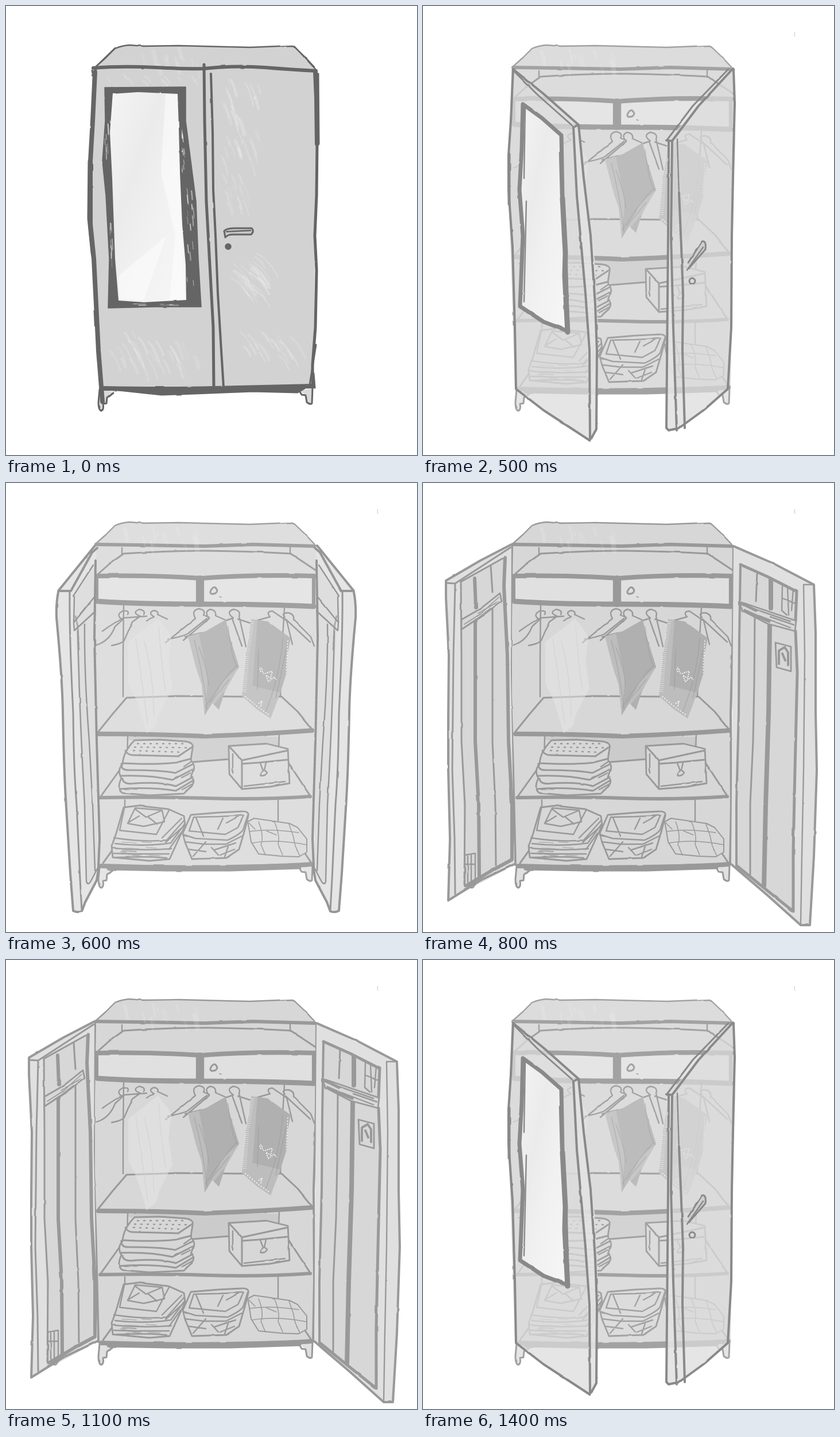
An HTML page that plays this animation: 716x782 px, repeating every 1500 ms.

```html
<!DOCTYPE html>
<html lang="en">
<head>
<meta charset="utf-8">
<title>Wardrobe</title>
<style>
  html, body { margin: 0; width: 100%; height: 100%; overflow: hidden; background: #fff; }
  svg { display: block; width: 100%; height: 100%; }
  path, circle { fill: none; stroke: var(--ink); stroke-width: 3; stroke-linecap: round; stroke-linejoin: round; }
  .fill { fill: var(--wood); stroke: none; }
  .pale { fill: var(--pale); stroke: none; }
  .dim { fill: var(--dim); stroke: none; }
  .solid { fill: var(--ink); }
  .w1 { stroke-width: 1.5; } .w2 { stroke-width: 2.4; } .w4 { stroke-width: 4; }
  .w5 { stroke-width: 5; } .w6 { stroke-width: 6; } .w8 { stroke-width: 8; }
  .item { fill: var(--wood); stroke-width: 2.8; }
  .cloth { fill: var(--cloth); stroke: none; }
  .sheen { fill: #fff; stroke: none; opacity: .16; }
  .scuff path { stroke: #fff; }

  .scene { animation: 1500ms step-end infinite; }
  #shut { --ink: #656565; --wood: #d2d2d2; --pale: #dadada; animation-name: shut; }
  #ajar { --ink: #a2a2a2; --wood: #dcdcdc; --pale: #e5e5e5; --dim: #d3d3d3; --cloth: #bcbcbc; animation-name: ajar; }
  #half { --ink: #a0a0a0; --wood: #dedede; --pale: #e5e5e5; --dim: #d3d3d3; --cloth: #bababa; animation-name: half; }
  #open { --ink: #999; --wood: #d7d7d7; --pale: #e0e0e0; --dim: #cbcbcb; --cloth: #b0b0b0; animation-name: open; }
  @keyframes shut { 0% { opacity: 1 } 33.333%, 100% { opacity: 0 } }
  @keyframes ajar { 0% { opacity: 0 } 33.333% { opacity: 1 } 40% { opacity: 0 } 93.333%, 100% { opacity: 1 } }
  @keyframes half { 0% { opacity: 0 } 40% { opacity: 1 } 53.333% { opacity: 0 } 86.666% { opacity: 1 } 93.333%, 100% { opacity: 0 } }
  @keyframes open { 0% { opacity: 0 } 53.333% { opacity: 1 } 86.666%, 100% { opacity: 0 } }
</style>
</head>
<body>
<svg viewBox="0 0 716 782" preserveAspectRatio="none">
  <defs>
    <filter id="rough" x="0" y="0" width="716" height="782" filterUnits="userSpaceOnUse" color-interpolation-filters="sRGB">
      <feTurbulence type="fractalNoise" baseFrequency=".035" numOctaves="2" seed="4"/>
      <feDisplacementMap in="SourceGraphic" scale="2" xChannelSelector="R" yChannelSelector="G"/>
    </filter>
    <linearGradient id="glass" x2="1" y2="1">
      <stop offset="0" stop-color="#f4f4f4"/><stop offset=".35" stop-color="#ebebeb"/>
      <stop offset=".6" stop-color="#f1f1f1"/><stop offset="1" stop-color="#f6f6f6"/>
    </linearGradient>

    <g id="carcass">
      <path class="fill" d="M154,108 190,74 215,68 420,72 500,69 541,110 544,240 538,400 536,664 163,668 154,440 148,320z"/>
      <path class="w2" d="M156,106 174,90 190,74 Q202,69 215,68 L240,70 300,69 380,71 425,72 500,69 520,88 537,106"/>
    </g>
    <g id="feet">
      <path class="pale" d="M163,668 161,690 Q162,704 167,705 L170,692 175,690 178,680 187,672z M512,670 522,678 524,690 533,693 534,666z"/>
      <path d="M163,668 161,690 Q161,704 166,705 Q171,703 169,693 L175,692 176,682 187,673"/>
      <path d="M511,670 515,677 522,678 524,690 Q530,695 533,692 L534,666"/>
    </g>

    <g id="shelves">
      <path class="pale" d="M160,166H330V207L160,204z M346,167 532,166V212L346,209z"/>
      <path class="dim" d="M212,442H476L478,463 454,455 390,456 386,482 326,485 322,456 214,448z"/>
      <path class="w2" d="M202,113V124 M495,110V124"/>
      <path d="M161,158 180,141 205,123 Q280,118 350,118 Q430,119 496,123 L541,153"/>
      <path class="w6" d="M157,107 230,108 345,110 430,107 538,110"/>
      <path class="w8" d="M159,162 Q250,160 340,166 Q430,159 537,162"/>
      <path style="stroke-width:9" d="M159,206 Q230,211 340,211 T536,215"/>
      <path style="stroke-width:14" d="M338,168V209"/>
      <path class="w6" d="M158,165V204 M536,165V212"/>
      <path d="M359,184 Q364,178 368,187 Q367,194 357,193 Q354,190 359,184"/>
      <path class="w1" d="M372,198 375,199"/>
      <path class="w2" d="M205,213 204,300 204,372 M485,218 480,300 478,372"/>
      <path d="M161,433 186,402 210,374 300,371 400,372 480,372 508,398 534,430"/>
      <path class="w8" d="M161,437 Q260,437 345,441 Q440,438 533,431"/>
      <path class="w2" d="M212,442 211,485 M476,437 475,462"/>
      <path d="M165,546 205,490 M326,486 388,481 M490,484 530,545"/>
      <path class="w6" d="M164,548 Q260,546 350,549 T530,546"/>
      <path class="w2" d="M207,552V576 M474,550V588"/>
      <path d="M169,662 187,637 M520,644 531,660"/>
      <path class="w8" d="M166,667 Q280,671 390,669 T532,664"/>
      <path class="w5" d="M178,672 280,674 390,674 512,670"/>
    </g>

    <g id="clothes">
      <path class="w2" d="M157,282 Q180,276 190,250 L203,238 Q190,230 203,223 Q216,221 212,229"/>
      <path class="w2" d="M184,283 Q202,280 206,274 L220,242 234,232 Q218,226 232,220 Q244,222 240,229 M168,258 Q190,242 205,235 L245,232"/>
      <path class="w2" d="M245,240 258,233 Q246,226 258,222 Q267,224 264,229 L281,237"/>
      <path class="w2" d="M278,278 330,236 Q322,222 336,219 Q349,221 344,230 L354,234 M282,272 Q305,268 316,263 L350,236"/>
      <path class="w2" d="M309,274 354,236 Q344,224 356,220 Q367,222 365,231 L383,239 M312,268 340,261"/>
      <path class="w2" d="M382,240 396,235 Q382,225 396,220 Q410,222 406,232 L418,285 M394,236 411,284 M404,237 432,246"/>
      <path class="w2" d="M428,242 460,233 Q452,224 464,223 L489,240 499,281 M486,234 Q478,226 492,226 Q503,229 501,238 L531,268 537,284 M487,237 530,277"/>

      <path style="fill:#e7e7e7;stroke:none;opacity:.5" d="M213,277 265,236 282,258 288,270 283,310 290,357 267,402 261,423 245,436 229,382 213,348z"/>
      <path class="w1" style="stroke:#d0d0d0;opacity:.6" d="M226,272 Q236,340 247,420 M241,276 Q256,330 258,405 M266,250 Q270,310 278,362"/>

      <path class="cloth" d="M317,267 348,258 383,238 389,265 406,320 382,361 371,395 360,384 346,405 341,352 330,318z"/>
      <path class="sheen" d="M317,267 336,262 352,340 346,405 341,352 330,318z M378,345 406,320 382,361 346,405z"/>
      <path class="w1" style="opacity:.5" d="M328,274 Q344,334 350,394 M336,286 Q350,320 353,352 M347,390 Q373,350 401,318 M356,382 389,342 M387,250 Q392,304 404,322"/>

      <path class="cloth" d="M427,237 456,241 496,270 490,300 489,330 478,365 461,410 437,394 411,371 418,300z"/>
      <path class="sheen" d="M427,237 438,239 428,372 411,371 418,300z M424,352 478,365 461,410 437,394 411,371z"/>
      <path class="w1" style="opacity:.5" d="M482,270 Q478,335 452,400 M488,290 470,375 M440,290 438,360"/>
      <g class="scuff">
        <path style="stroke-width:7;stroke-dasharray:1 2.6;stroke-linecap:butt;opacity:.5" d="M429,241 420,300 415,366"/>
        <path style="stroke-width:1.6;stroke-dasharray:2 1.6;stroke-linecap:butt" d="M444,329 Q440,320 446,323 Q446,336 456,330 L464,328 461,340 453,335 457,346 467,338 471,343 M440,384 446,380 444,389"/>
        <path class="w1" style="stroke-dasharray:1 4" d="M491,275 488,330 M417,372 440,391 460,405"/>
      </g>
    </g>

    <g id="linen">
      <path class="item" d="M203,540 Q192,533 201,514 Q193,500 203,490 Q204,468 224,448 L268,447 312,450 Q328,452 325,462 L322,482 Q330,492 327,500 L323,512 Q330,518 324,527 L310,541 250,544z"/>
      <path d="M208,466 Q212,475 225,474 L300,476 324,460 M203,488 Q260,491 296,487 L323,480 M201,489 Q200,501 215,500 Q270,500 295,505 L325,490 M199,510 Q250,508 290,517 L325,499 M203,515 Q204,526 225,523 Q270,520 296,528 L326,512 M198,533 Q250,529 296,536 L326,518"/>
      <path class="w2" d="M310,494 323,485 M306,513 322,505 M307,534 325,524 M313,537 324,528"/>
      <path class="w2" style="stroke-dasharray:2 9" d="M229,454H312 M224,460 316,461 M222,466 310,469"/>

      <path class="item" d="M388,458 454,454 491,463 494,523 460,529 411,533 389,507z"/>
      <path d="M389,459 411,483 490,466 M411,483V531 M412,489 440,487 490,482"/>
      <path class="w2" d="M443,488 448,501 Q440,505 444,510 Q453,510 455,504 L450,500 453,487 M395,472V505 M415,528 486,520"/>

      <path class="item" d="M186,652 184,633 192,610 205,565 230,562 283,568 310,580 312,596 300,622 285,655 250,658z"/>
      <path class="w2" d="M206,567 198,605 262,612 284,570 M212,593 225,566 272,570 276,590 240,598z M225,568 244,582 270,571 M232,580 212,592 M247,581 263,594"/>
      <path class="w2" d="M188,618 Q240,626 280,622 L310,588 M190,628 Q240,634 287,627 L311,594 M186,636 Q240,641 288,637 M188,645 220,646 284,646 M193,652 250,651 280,653 M272,618 306,584 M284,638 304,610 M278,626 309,598"/>
      <g id="hatch"></g>

      <path class="item" d="M308,610 322,578 370,574 410,572 Q424,571 422,580 L416,604 406,638 384,653 324,655 312,626z"/>
      <path class="w2" d="M308,612 330,619 386,622 Q408,612 413,604 L421,579 M327,582 319,606 382,612 404,600 414,579 370,581z M331,583 344,615 M378,584 369,603 M384,592 406,580 M312,625 345,629 383,629 411,615 M318,638 348,642 M363,639 400,627 M326,650 348,625 M358,635 370,648 M373,648 398,638 M388,630 381,651"/>

      <path class="item" style="stroke-width:2" d="M421,590 432,584 460,588 494,593 508,600 524,620 524,643 510,651 480,650 440,646 427,625 424,606z"/>
      <path class="w1" d="M424,607 Q460,601 510,609 M429,627 Q470,620 523,630 M440,590 Q450,615 444,630 L452,648 M468,591 Q478,615 474,629 L482,648 M493,594 500,614 504,632 512,650 M423,592 434,603 M454,606 471,613"/>
    </g>
    <g id="inside"><use href="#carcass"/><use href="#feet"/><use href="#shelves"/><g class="scuff grain"></g><use href="#clothes"/><use href="#linen"/><path class="w1" style="stroke:#d8d8d8" d="M648,46 Q646,49 648,53"/></g>

    <g id="leaf">
      <path class="pale" d="M157,108 91,188 88,225 93,300 99,400 104,550 112,680 117,745 132,746 160,690 162,665 155,300z"/>
      <path class="fill" d="M119,198 153,146 155,400 160,668 142,700 131,500z"/>
      <path class="w4" d="M159,113 150,121 113,188 91,188 125,146 155,109 M91,190 Q87,210 88,235 Q98,340 99,400 Q101,500 104,550 L112,680 117,745 Q125,749 132,746 L138,730 158,692 162,668"/>
      <path d="M111,190 Q110,260 117,400 Q118,500 123,560 L129,690 132,744"/>
      <path class="w2" d="M117,197 152,143 M119,198 118,243 M118,243 156,196 M119,257 156,223 M118,243 119,257"/>
      <path class="w2" d="M125,258 Q128,400 137,560 L140,694 Q143,703 149,691 L160,670 M137,246 Q136,330 145,450 L151,560 155,675"/>
      <path class="w4" style="stroke-dasharray:26 2 7 1" d="M156,135 154,270 158,450 163,620 161,668"/>
      <path style="stroke-dasharray:8 3;opacity:.7" d="M121,232 125,250 127,290"/>
    </g>
  </defs>

  <g class="scene" id="shut"><g filter="url(#rough)">
    <use href="#carcass"/><use href="#feet"/>
    <g class="scuff grain"></g><g class="scuff" id="doorGrain"></g>
    <path class="w6" d="M152,108 Q200,104 260,107 T344,109 Q400,103 450,107 T540,113"/>
    <path class="w2" d="M150,121 160,106 M157,105 190,73 M502,70 540,111"/>
    <path class="w8" d="M155,115 151,200 147,270 147,380 153,440 157,520 161,600 168,689"/>
    <path d="M144,270 143,370 149,430 154,457 M150,112 152,122"/>
    <path class="w8" d="M539,114 541,160 542,240"/>
    <path class="w5" d="M542,240 541,330 538,400 541,460 539,560 534,625 534,662"/>
    <path d="M544,118 545,240 M540,590 529,660 M536,640 538,665"/>
    <path class="w5" d="M345,102 346,200 349,340 355,450 361,560 362,664"/>
    <path class="w4" d="M357,118 360,220 361,320 365,400 369,500 375,600 379,664"/>
    <path class="w8" d="M172,666 Q280,668 360,666 T535,662"/>
    <path class="solid" d="M187,668 270,677 330,675 430,671 508,673 520,666 360,668z"/>
    <path class="solid w1" d="M172,142 313,141 313,200 322,270 331,340 335,440 340,524 260,524 178,526 180,440 174,330 168,270 173,200z"/>
    <path style="fill:url(#glass);stroke:none" d="M186,153 230,150 299,153 301,210 303,290 307,380 313,450 314,512 240,516 196,513 190,440 185,300 181,220z"/>
    <path style="fill:#fff;stroke:none;opacity:.5" d="M278,153 298,155 303,300 312,510 285,512 295,400 270,290z M196,470 280,400 240,512 198,511z"/>
    <g class="scuff" id="frameGrain"></g>
    <path style="fill:#c8c8c8" d="M382,403 380,392 Q384,387 400,387 L428,387 Q433,392 427,398 L395,398 Q386,398 382,403"/>
    <path class="w2" d="M384,393 426,391"/>
    <circle class="solid w1" cx="387" cy="419" r="5"/>
  </g></g>

  <g class="scene" id="ajar"><g filter="url(#rough)">
    <use href="#inside"/>
    <g style="--ink:#898989">
      <path class="fill" style="opacity:.72" d="M157,110 271,207 285,320 300,450 305,560 303,735 292,757 160,667 149,320z M540,110 425,235 428,400 424,738 442,738 531,668 538,400z"/>
      <path class="pale" style="opacity:.7" d="M262,210 271,207 285,320 300,450 303,735 292,757 283,500z M425,235 434,235 433,500 442,738 425,738z"/>
      <path class="w4" d="M157,110 153,200 149,260 149,320 156,420 160,560 162,667 210,704 291,757 M541,110 543,170 541,250 538,400 537,560 531,667 490,703 442,738"/>
      <path class="w5" d="M150,258 150,345"/>
      <path class="w4" d="M157,110 210,153 271,207 262,211 M262,211 268,330 283,500 290,600 291,757 M271,207 280,300 292,400 300,520 303,600 302,737 291,757"/>
      <path d="M158,113 200,155 262,210"/>
      <path class="w4" d="M540,109 480,174 434,235 424,234 M428,235 427,400 424,735 428,739 442,736 M434,235 432,400 436,560 442,739"/>
      <path d="M532,110 470,174 426,232"/>
      <path class="w2" style="stroke-dasharray:16 2" d="M443,232 446,330"/>
      <path class="w4" d="M446,325 450,420 453,500 452,600 456,735"/>
      <path style="fill:url(#glass);stroke-width:7" d="M174,171 207,195 241,225 243,330 248,430 252,566 210,550 169,523 174,400 168,320 172,250z"/>
      <path style="stroke-width:9" d="M243,335 248,430 247,470 252,568"/>
      <path class="w2" d="M178,178 176,300 M238,255 240,330 M180,340 176,515"/>
      <path style="fill:#cfcfcf" d="M462,447 486,410 Q494,408 492,424 L463,457"/>
      <path class="w2" d="M460,460 488,420"/>
      <circle cx="469" cy="479" r="5"/>
    </g>
  </g></g>

  <g class="scene" id="half"><g filter="url(#rough)">
    <use href="#inside"/>
    <g style="--ink:#969696"><use href="#leaf"/><use href="#leaf" transform="matrix(-1 0 0 1 697 0)"/></g>
  </g></g>

  <g class="scene" id="open"><g filter="url(#rough)">
    <use href="#inside"/>
    <path class="w4" d="M155,108 153,240 153,370 157,500 161,665 M541,110 540,260 536,400 537,560 535,664"/>
    <path class="pale" d="M154,106 40,170 40,200 45,300 44,500 47,620 44,727 159,665 153,330z M541,110 681,177 684,260 686,500 681,650 674,770 658,770 537,665z"/>
    <path class="fill" d="M65,170 143,128 146,250 150,450 155,655 75,703 68,500 66,300z M552,140 650,190 648,240 650,500 645,745 548,665 550,400z"/>
    <path class="w4" d="M154,107 100,135 40,170 40,200 45,300 44,410 44,500 47,620 44,727 100,692 159,664"/>
    <path d="M40,174 56,175 153,112 M56,177 53,300 51,500 55,620 56,716 M66,172 143,129 M66,172 67,300 67,450 73,560 72,700"/>
    <path class="w6" d="M143,130 141,180 147,300 149,450 155,560 155,656 118,676 74,702"/>
    <path class="w6" d="M90,166 92,217 M91,232 91,450 97,560 98,686"/>
    <path d="M118,144 121,190 M121,216 121,450 126,560 127,666"/>
    <path class="item" d="M67,255 67,238 100,219 134,192 137,206 105,230z"/>
    <path class="w1" d="M72,246 100,228 132,199 M80,246 118,218 M96,227 130,207"/>
    <path class="w2" d="M73,648 91,645 91,700 73,703z M78,650V695 M84,648V700 M74,664H90"/>
    <circle class="w2" cx="85" cy="701" r="4"/>

    <path class="w4" d="M541,110 610,140 681,177 684,260 684,400 686,500 681,650 674,770 658,770 600,718 537,664"/>
    <path class="w2" d="M663,177 681,177 M663,177 665,300 663,500 660,650 658,768"/>
    <path class="w5" d="M553,142 600,163 651,189 M651,189 649,240 M649,258 652,330 648,500 645,640 645,746 600,710 547,667"/>
    <path class="w4" d="M553,142 551,270 550,400 546,560 546,666"/>
    <path d="M582,156 580,206 M578,234 577,350 575,450 570,560 570,682"/>
    <path class="w8" d="M606,168 606,218 M604,246 602,400 597,560 594,702"/>
    <path class="item" d="M553,207 600,223 650,240 648,258 600,245 556,222z"/>
    <path class="w5" d="M556,210 580,222 M560,222 603,241"/>
    <path class="w2" d="M570,217 640,241 M585,231 640,252 M605,233 646,247"/>
    <path class="w2" d="M626,180 625,222 634,230 M635,181 637,230 M645,185 642,222 M627,201 648,209"/>
    <path class="item" d="M614,278 641,285 641,328 616,321z"/>
    <path class="w4" d="M620,315 620,292 630,286 636,295 636,317 M626,297 631,309"/>
  </g></g>
</svg>
<script>
  let seed = 11;
  const rnd = () => (seed = seed * 16807 % 2147483647) / 2147483647;

  // Brush strokes scattered in a box, all leaning along (dx, dy).
  function scuff(host, n, x, y, w, h, dx, dy, width, alpha) {
    for (let i = 0; i < n; i++) {
      const k = .3 + rnd() * .7, px = x + rnd() * w, py = y + rnd() * h;
      const p = document.createElementNS('http://www.w3.org/2000/svg', 'path');
      p.setAttribute('d', `M${px},${py} q${dx * k * .6},${dy * k * .3} ${dx * k},${dy * k}`);
      p.style.cssText = `stroke-width:${width * (.4 + rnd())};opacity:${alpha * (.4 + rnd() * .6)}`;
      host.append(p);
    }
  }

  for (const g of document.querySelectorAll('.grain')) {
    scuff(g, 12, 205, 74, 130, 30, 6, 26, 6, .16);
    scuff(g, 10, 180, 580, 150, 45, 14, 35, 5, .14);
    scuff(g, 8, 390, 460, 50, 30, 30, 35, 3, .14);
  }
  const door = document.getElementById('doorGrain');
  scuff(door, 26, 375, 125, 65, 140, 14, 40, 4, .22);
  scuff(door, 16, 378, 290, 40, 70, 10, 28, 3, .18);
  scuff(door, 20, 385, 430, 55, 70, 38, 42, 2.5, .28);
  scuff(door, 20, 405, 560, 95, 55, 26, 38, 3, .22);
  scuff(door, 22, 175, 565, 150, 55, 20, 38, 4, .22);
  scuff(door, 10, 165, 118, 160, 12, 10, 12, 3, .2);

  const frame = document.getElementById('frameGrain');
  scuff(frame, 12, 306, 205, 5, 100, 2, 16, 1.6, .7);
  scuff(frame, 16, 314, 310, 12, 180, 2, 20, 1.6, .7);
  scuff(frame, 8, 172, 205, 6, 60, 1, 20, 1.6, .7);
  scuff(frame, 8, 181, 370, 5, 120, 1, 24, 1.4, .7);
  scuff(frame, 8, 190, 518, 110, 4, 16, 0, 1.4, .6);

  scuff(document.getElementById('hatch'), 16, 190, 624, 60, 28, 34, 2, 1.5, .9);
</script>
</body>
</html>
```
